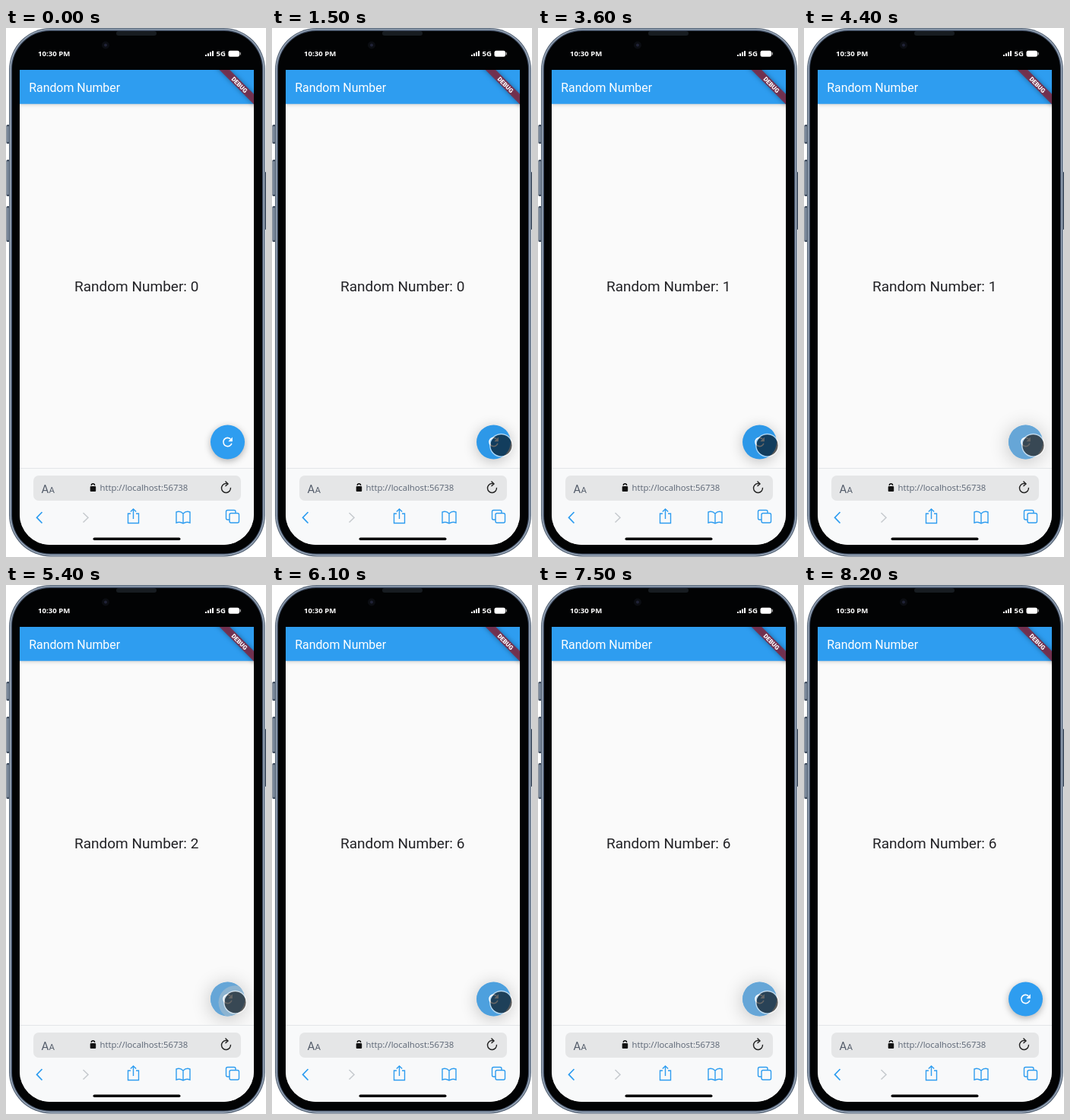
These frames come from a looping animation (342 by 695 pixels, 9.2 s). An HTML page with a canvas:

```html
<!DOCTYPE html>
<html lang="en">
<head>
<meta charset="utf-8">
<title>Random Number</title>
<style>
  html, body { margin: 0; width: 100%; height: 100%; overflow: hidden; background: #fff; }
  canvas { display: block; }
</style>
</head>
<body>
<canvas id="stage" width="342" height="695"></canvas>
<script>
const ctx = document.getElementById('stage').getContext('2d');
const LOOP = 9200, STEP = 100;
const BLUE = '#2e9df0';
const FAB = { x: 291.5, y: 544, r: 22.5 };
const REST = { x: 301.5, y: 548.3 };
const CLICKS = [1900, 2600, 3100, 3800, 4300, 4800, 5200, 5700, 6200, 6700, 7200];
const VALUES = [[5900, 6], [5000, 2], [3300, 1], [0, 0]];

const clamp = v => Math.max(0, Math.min(1, v));
const ramp = (t, from, to) => clamp((t - from) / (to - from));
const easeOut = v => 1 - (1 - v) ** 3;

function box(x, y, w, h, r, fill) {
  ctx.beginPath();
  ctx.roundRect(x, y, w, h, r);
  ctx.fillStyle = fill;
  ctx.fill();
}

function disc(x, y, r, fill) {
  ctx.beginPath();
  ctx.arc(x, y, r, 0, Math.PI * 2);
  ctx.fillStyle = fill;
  ctx.fill();
}

function line(color, width, ...points) {
  ctx.beginPath();
  points.forEach(([x, y], i) => i ? ctx.lineTo(x, y) : ctx.moveTo(x, y));
  ctx.strokeStyle = color;
  ctx.lineWidth = width;
  ctx.stroke();
}

function label(text, x, y, font, color, align = 'left') {
  ctx.font = font;
  ctx.fillStyle = color;
  ctx.textAlign = align;
  ctx.fillText(text, x, y);
}

function shadow(color, blur, dy) {
  ctx.shadowColor = color;
  ctx.shadowBlur = blur;
  ctx.shadowOffsetY = dy;
}

function scoped(draw) {
  ctx.save();
  draw();
  ctx.restore();
}

function drawPhone() {
  for (const [y, h] of [[127, 25], [173, 48], [234, 47]]) {
    box(0.5, y, 5, h, 1.5, '#414e60');
    box(1.5, y + 2, 2, h - 4, 1, '#8e9cae');
  }
  box(338, 189, 4, 76, 1, '#414e60');
  box(4, 0, 337, 694.5, 55, '#5a687a');
  box(5.2, 1.2, 334.6, 692, 54, '#a3b1c2');
  box(6.6, 2.6, 331.8, 689.2, 52, '#46546a');
  box(8, 4, 329, 686.5, 50, '#020304');
  box(145, 4, 53, 6, 3, '#171c21');
  disc(131, 22.5, 5, '#0b0d12');
  disc(131, 22.5, 2, '#202337');

  const status = '700 9.6px "Noto Sans", sans-serif';
  label('10:30 PM', 42, 37, status, '#fff');
  for (let i = 0; i < 4; i++) box(262 + i * 3, 35 - i * 1.7, 2, 2 + i * 1.7, 0.5, '#fff');
  label('5G', 276.5, 37, status, '#fff');
  box(292.5, 29.7, 14.5, 8, 2.5, '#fff');
  box(307.6, 32, 1.2, 3.5, 0.6, '#ccc');
}

function drawBanner() {
  scoped(() => {
    ctx.translate(326, 55);
    ctx.rotate(Math.PI / 4);
    scoped(() => {
      shadow('rgba(0,0,0,.5)', 6, 0);
      box(-40, 22.4, 80, 9.6, 0, 'rgba(140,28,50,.75)');
    });
    label('DEBUG', 0.5, 30.1, '900 8.1px Roboto, sans-serif', '#fff', 'center');
  });
}

function refreshIcon(x, y, scale, color) {
  scoped(() => {
    ctx.translate(x, y);
    ctx.scale(scale, scale);
    ctx.beginPath();
    ctx.arc(0, 0, 7, 0.3, -0.85);
    ctx.strokeStyle = color;
    ctx.lineWidth = 2;
    ctx.stroke();
    ctx.beginPath();
    ctx.moveTo(1, -1);
    ctx.lineTo(8, -1);
    ctx.lineTo(8, -8);
    ctx.fillStyle = color;
    ctx.fill();
  });
}

function drawFab(t) {
  const over = t >= 1400 && t < 7900;
  const age = t - (CLICKS.filter(c => c <= t).pop() ?? -LOOP);
  const glow = ramp(age, -50, 100) * (1 - ramp(age, 320, 500));

  scoped(() => {
    shadow(`rgba(0,0,0,${over ? 0.24 : 0.3})`, over ? 18 + 8 * glow : 10, over ? 3 : 2.5);
    disc(FAB.x, FAB.y, FAB.r, over ? '#2d98e8' : BLUE);
  });
  scoped(() => {
    ctx.beginPath();
    ctx.arc(FAB.x, FAB.y, FAB.r, 0, Math.PI * 2);
    ctx.clip();
    disc(FAB.x, FAB.y, FAB.r, `rgba(188,188,188,${0.4 * glow})`);
    const fade = 1 - ramp(age, 200, 300);
    if (fade) disc(REST.x, REST.y, 6 + 0.08 * age, `rgba(200,200,200,${0.4 * fade})`);
  });
  refreshIcon(FAB.x, FAB.y, 0.8, '#fff');
}

function drawBrowserBar() {
  box(18, 578, 308, 101, 0, '#f8f9fa');
  box(18, 578, 308, 1, 0, '#e3e6e8');
  box(36, 588, 273, 33, 7, '#e5e6e7');
  label('A', 46.5, 611, '15px Roboto, sans-serif', '#525b69');
  label('A', 56.6, 611, '11.5px Roboto, sans-serif', '#525b69');

  box(110.7, 602, 7.5, 7, 1, '#111');
  ctx.beginPath();
  ctx.arc(114.45, 601, 2.2, Math.PI, 0);
  ctx.strokeStyle = '#111';
  ctx.lineWidth = 1.4;
  ctx.stroke();
  label('http://localhost:56738', 123.5, 608, '11.3px "Open Sans", sans-serif', '#5b6574');

  ctx.beginPath();
  ctx.arc(289.5, 604.5, 6, -0.1, -1.2, false);
  ctx.strokeStyle = '#222';
  ctx.lineWidth = 1.4;
  ctx.stroke();
  line('#222', 1.4, [288.5, 595.5], [292, 599], [288.5, 602]);

  line(BLUE, 1.7, [47.5, 636], [40.5, 643.2], [47.5, 650.5]);
  line('#c6cace', 1.5, [101.5, 637], [108, 643.2], [101.5, 649.5]);

  line(BLUE, 1.4, [164, 638], [160.5, 638], [160.5, 650.5], [174.5, 650.5], [174.5, 638], [171, 638]);
  line(BLUE, 1.4, [167.5, 645], [167.5, 632]);
  line(BLUE, 1.4, [163.8, 635.5], [167.5, 632], [171.2, 635.5]);

  ctx.beginPath();
  for (const side of [-1, 1]) {
    ctx.moveTo(233, 638);
    ctx.quadraticCurveTo(233 + side * 4, 634, 233 + side * 9, 636);
    ctx.lineTo(233 + side * 9, 650);
    ctx.quadraticCurveTo(233 + side * 4, 648, 233, 651);
  }
  ctx.moveTo(233, 638);
  ctx.lineTo(233, 651);
  ctx.lineWidth = 1.4;
  ctx.stroke();

  ctx.beginPath();
  ctx.roundRect(289.5, 633.5, 12.5, 12.5, 2);
  ctx.stroke();
  ctx.beginPath();
  ctx.roundRect(294, 637.5, 12.5, 12.5, 2);
  ctx.fillStyle = '#f8f9fa';
  ctx.fill();
  ctx.stroke();
  box(114.5, 669.5, 115, 3.6, 1.8, '#050505');
}

function drawScreen(t) {
  scoped(() => {
    ctx.beginPath();
    ctx.roundRect(18, 55, 308, 624, [0, 0, 40, 40]);
    ctx.clip();
    box(18, 55, 308, 624, 0, '#fafafa');
    scoped(() => {
      shadow('rgba(0,0,0,.22)', 5, 1.5);
      box(18, 55, 308, 44.7, 0, BLUE);
    });
    label('Random Number', 30.2, 84, '15.9px Roboto, sans-serif', '#fff');
    drawBanner();
    const value = VALUES.find(([start]) => t >= start)[1];
    label(`Random Number: ${value}`, 90, 345.8, '19px Roboto, sans-serif', '#222226');
    drawFab(t);
    drawBrowserBar();
  });
}

function drawPointer(t) {
  if (t < 900 || t >= 8200) return;
  const away = 1 - easeOut(ramp(t, 800, 1500)) + ramp(t, 7700, 8200) ** 2;
  const x = REST.x + 48 * away, y = REST.y + 120 * away;
  disc(x, y, 14.2, 'rgba(0,0,0,.6)');
  ctx.beginPath();
  ctx.arc(x, y, 14.8, 0, Math.PI * 2);
  ctx.strokeStyle = 'rgba(255,255,255,.6)';
  ctx.lineWidth = 1.4;
  ctx.stroke();
}

function render(now) {
  const t = Math.floor((now % LOOP) / STEP) * STEP;
  ctx.fillStyle = '#fff';
  ctx.fillRect(0, 0, 342, 695);
  drawPhone();
  drawScreen(t);
  drawPointer(t);
}

let start;
function tick(now) {
  start ??= now;
  render(now - start);
  requestAnimationFrame(tick);
}
render(0);
requestAnimationFrame(tick);
</script>
</body>
</html>
```
